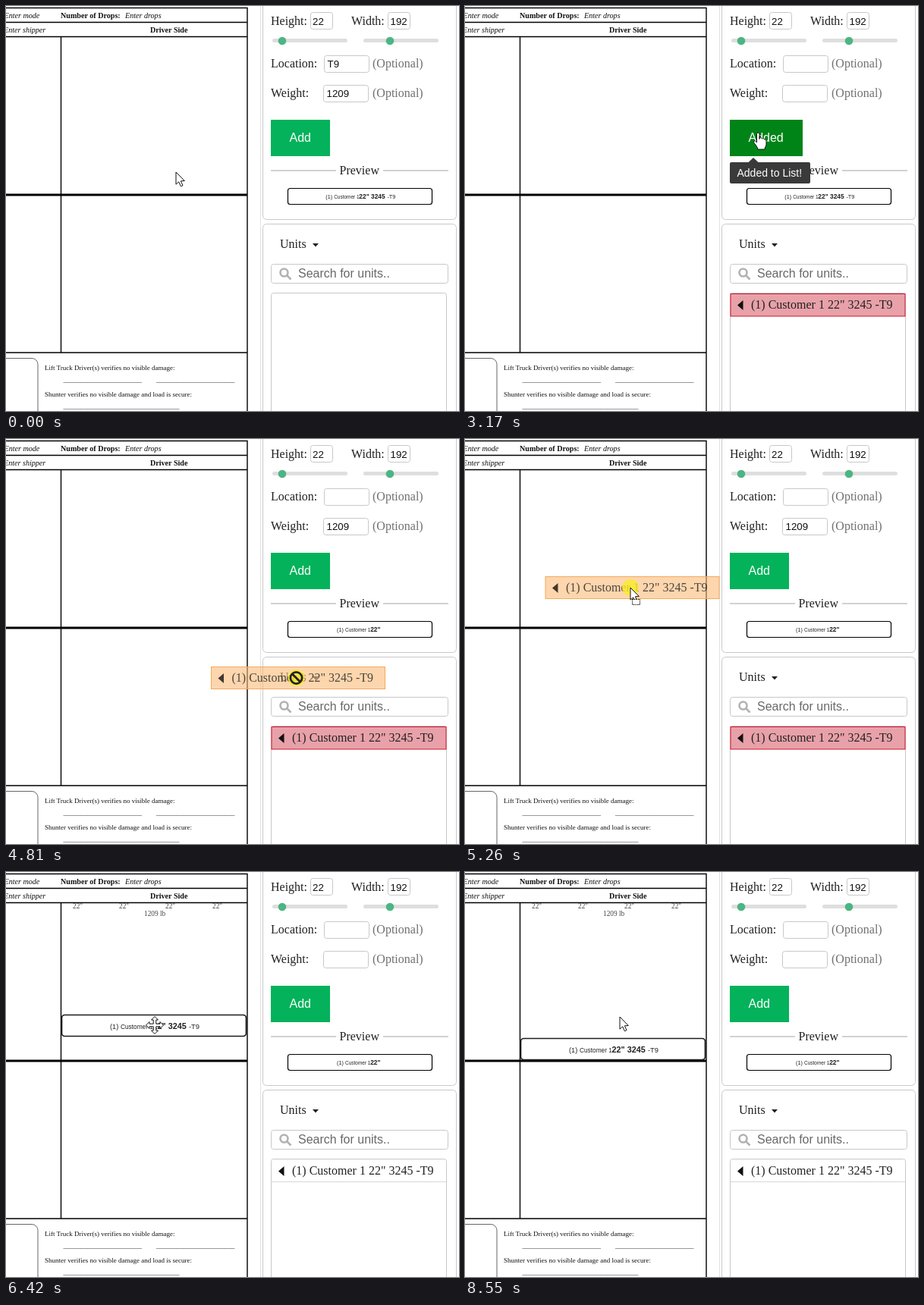
Animation of 597x534 px, one loop 9.71 s. Source, as an HTML page:

```html
<!DOCTYPE html>
<html lang="en">
<head>
<meta charset="utf-8">
<title>Drag a unit to the truck</title>
<style>
html, body { margin: 0; width: 100%; height: 100%; overflow: hidden; background: #fff; }
svg { display: block; width: 597px; height: 534px; }
text { font-family: "Liberation Serif", "Times New Roman", serif; font-size: 16px; fill: #212121; white-space: pre; }
.sans, .label text { font-family: "Liberation Sans", Arial, sans-serif; }
.field { font-size: 13.33px; fill: #111; }
.b { font-weight: bold; }
.i { font-style: italic; }
.form text { font-size: 10.1px; fill: #111; }
.form .small { font-size: 9px; }
.dims text { font-size: 9.3px; fill: #444; }
.grey { fill: #707070; }
.line { fill: none; stroke: #000; stroke-width: 1.4; }
.frame { fill: #fff; stroke: #c8c8c8; }
.tip path, .tip rect { fill: #3a3a3a; }
.tip text { fill: #fff; font-size: 14px; }
.ink { fill: #fff; stroke: #111; stroke-linejoin: round; }
</style>
</head>
<body>
<svg viewBox="0 0 597 534">
  <defs>
    <g id="full" class="label">
      <text x="-58" y="4" font-size="9.2" style="font-size:9.2px">(1)</text>
      <text x="-44" y="4" style="font-size:8.3px">Customer 1</text>
      <text class="b" x="-1.5" y="4" style="font-size:10.8px">22" 3245</text>
      <text x="46" y="4" style="font-size:9.4px">-T9</text>
    </g>
    <g id="brief" class="label">
      <text x="-39" y="4" style="font-size:9.2px">(1)</text>
      <text x="-25" y="4" style="font-size:8.3px">Customer 1</text>
      <text class="b" x="17.5" y="4" style="font-size:10.8px">22"</text>
    </g>
    <g id="row">
      <path d="M359 394.500l7.500-6.500v13z" fill="#111"/>
      <text x="377" y="399">(1) Customer 1 22" 3245 -T9</text>
    </g>
    <g id="unit">
      <rect x="-121.500" y="-14" width="243" height="28" rx="4" fill="#fff" stroke="#1c1c1c" stroke-width="1.700"/>
      <use href="#full"/>
    </g>
    <path id="pointer" class="ink" d="M0 0V16.200L3.700 12.800 6.400 18.800 9 17.600 6.400 11.800 11.300 11.500z"/>
  </defs>

  <g class="form">
    <path class="line" d="M0 2.500H318V534M0 21.500H318M0 40.500H318M72.500 40.500V457M0 457H318"/>
    <path class="line" style="stroke-width:3" d="M0 249H318"/>
    <rect x="-20" y="464.500" width="62" height="90" rx="8" fill="none" stroke="#666"/>
    <text class="i" x="-2.500" y="16">Enter mode</text>
    <text class="b" x="72" y="16">Number of Drops:</text>
    <text class="i" x="157" y="16">Enter drops</text>
    <text class="i" x="-3" y="35">Enter shipper</text>
    <text class="b" x="190" y="35">Driver Side</text>
    <text class="small" x="51" y="480">Lift Truck Driver(s) verifies no visible damage:</text>
    <text class="small" x="51" y="515">Shunter verifies no visible damage and load is secure:</text>
    <text class="small" x="75.500" y="496">_______________________</text>
    <text class="small" x="198" y="496">_______________________</text>
    <text class="small" x="75.500" y="531">__________________________________</text>
  </g>
  <g id="dims" class="dims">
    <text x="88" y="48">22"</text><text x="149" y="48">22"</text>
    <text x="210" y="48">22"</text><text x="272" y="48">22"</text>
    <text x="182" y="58">1209 lb</text>
  </g>

  <path d="M335.500 0V534" stroke="#e2e2e2"/>
  <rect class="frame" x="338.500" y="-20" width="255" height="301.500" rx="5"/>
  <rect class="frame" x="338.500" y="287.500" width="255" height="300" rx="5"/>

  <text x="349" y="25">Height:</text><text x="455" y="25">Width:</text>
  <text x="349" y="81">Location:</text><text x="349" y="120">Weight:</text>
  <text class="grey" x="483" y="81">(Optional)</text>
  <text class="grey" x="483" y="120">(Optional)</text>
  <rect class="frame" x="401.500" y="8.500" width="29" height="22" rx="3"/>
  <rect class="frame" x="503.500" y="8.500" width="29" height="22" rx="3"/>
  <rect class="frame" x="419.500" y="65.500" width="59" height="22" rx="3"/>
  <rect class="frame" x="418.500" y="104.500" width="59" height="22" rx="3"/>
  <text class="sans field" x="404" y="24.500">22</text>
  <text class="sans field" x="506.500" y="24.500">192</text>
  <text id="place" class="sans field" x="423.500" y="81">T9</text>
  <text id="weight" class="sans field" x="422.500" y="120">1209</text>
  <path d="M353.500 45.500H447.500M473.500 45.500H567.500" stroke="#dedede" stroke-width="5" stroke-linecap="round"/>
  <g fill="#4cb583"><circle cx="364" cy="46" r="5.300"/><circle cx="506" cy="46" r="5.300"/></g>

  <rect id="button" x="349" y="150" width="78" height="48"/>
  <text id="caption" class="sans" x="373.500" y="179" style="fill:#fff"></text>

  <path d="M349 217H435M497 217H583" stroke="#d2d2d2" stroke-width="2"/>
  <text x="439.500" y="222">Preview</text>
  <g id="preview">
    <rect x="-95" y="-10.500" width="190" height="21" rx="3" fill="#fff" stroke="#000" stroke-width="1.200"/>
    <use id="previewText" href="#full" transform="scale(.78)"/>
  </g>

  <text x="361" y="319">Units</text>
  <path d="M404 313h8l-4 4.500z" fill="#212121"/>
  <rect class="frame" x="349.500" y="340.500" width="233" height="25" rx="3"/>
  <g fill="none" stroke="#b2b2b2" stroke-width="2.600">
    <circle cx="366.500" cy="351.500" r="5"/><path d="M370.500 355.500L375.500 360.500"/>
  </g>
  <text class="sans" x="385" y="358" style="fill:#686868">Search for units..</text>
  <rect class="frame" x="349.500" y="378.500" width="231" height="190" rx="3"/>
  <g id="item">
    <path id="divider" d="M350 408.500H580" stroke="#d8d8d8"/>
    <rect id="itemFill" x="350" y="379.500" width="230" height="29.500" fill="#e8a1a9" stroke="#d0142c"/>
    <use href="#row"/>
  </g>

  <use id="placed" href="#unit"/>
  <g id="rowGhost">
    <rect x=".5" y=".5" width="229" height="29" fill="#fcbb79" fill-opacity=".6" stroke="#f3aa5c"/>
    <use href="#row" transform="translate(-349.500 -379)" opacity=".8"/>
  </g>
  <use id="unitGhost" href="#unit" opacity=".75"/>

  <g id="dragTip" class="tip">
    <path d="M395 281.500L402 275 409 281.500z"/>
    <rect x="371" y="281" width="147" height="28" rx="2"/>
    <text x="380" y="299">Drag and drop to truck</text>
  </g>
  <g id="addTip" class="tip">
    <path d="M373 206.500L380 200 387 206.500z"/>
    <rect id="addTipBox" x="349" y="206" width="86" height="28" rx="2"/>
    <text id="addTipText" class="sans" x="358.500" y="225"></text>
  </g>

  <g id="cursor">
    <circle id="press" r="11" fill="#f9ec2c" fill-opacity=".82"/>
    <use class="kind" data-kind="arrow" href="#pointer"/>
    <g class="kind" data-kind="drop">
      <use href="#pointer"/>
      <rect x="2.500" y="15.500" width="10" height="7" fill="#fff" stroke="#111" stroke-dasharray="1.500 1"/>
    </g>
    <path class="kind ink" data-kind="move" d="M0-11.500L4.500-7H1.800V-1.800H7V-4.500L11.500 0 7 4.500V1.800H1.800V7H4.500L0 11.500-4.500 7H-1.800V1.800H-7V4.500L-11.500 0-7-4.500V-1.800H-1.800V-7H-4.500z"/>
    <path class="kind ink" data-kind="hand" d="M-1.500 2C-1.500-.5 2-.5 2 2V8.500C3-.0 2 6.500 5.500 8 6.500 7 8.500 7.500 8.500 9 10 8.500 11 9.500 11 11V15.500C11 18 9 19 9 22H0C0 19-4.500 15-5.500 12.500-5.500 10.500-3.500 10-1.500 13z"/>
    <g class="kind" data-kind="no" fill="none" stroke="#222" stroke-width="2.800">
      <circle r="7.600"/><path d="M-5.300-5.300L5.300 5.300"/>
    </g>
  </g>
</svg>
<script>
const LOOP = 9710;
const el = {};
document.querySelectorAll('svg [id]').forEach(n => el[n.id] = n);
const kinds = [...document.querySelectorAll('.kind')];

// start, end, steps, then [progress, x, y] stops
const moves = [
  [370, 1060, 10, [[0, 224, 219], [1, 432, 250]]],
  [1780, 2160, 6, [[0, 432, 250], [1 / 6, 427, 235], [1, 386, 167]]],
  [3650, 4260, 9, [[0, 386, 167], [1, 462, 394]]],
  [4560, 5500, 13, [[0, 462, 394], [4 / 13, 382.5, 315], [6 / 13, 290, 235], [9 / 13, 218, 196], [1, 210, 195]]],
  [5560, 5970, 6, [[0, 210, 195], [1, 196, 202]]],
  [7200, 7760, 8, [[0, 196, 202], [1, 213, 220]]],
  [8140, 8550, 6, [[0, 213, 220], [1, 204, 191]]]
];

// [time, value] tables; a value holds until the next entry
const tracks = {
  kind: [[0, 'arrow'], [900, 'move'], [1840, 'arrow'], [2008, 'hand'], [3726, 'arrow'], [3802, 'move'], [3878, 'arrow'],
    [4260, 'move'], [4560, 'no'], [4951, 'drop'], [6360, 'move'], [7200, 'drop'], [7990, 'move'], [8140, 'arrow']],
  press: [[0, 0], [2860, 1], [3010, 0], [4560, 1], [6360, 0], [7050, 1], [7990, 0]],
  place: [[0, 'T9'], [2940, '']],
  weight: [[0, '1209'], [2940, ''], [4560, '1209'], [6420, ''], [7200, '1209'], [8140, '']],
  button: [[0, 'idle'], [2008, 'hover'], [2940, 'added'], [3726, 'idle']],
  addTip: [[0, ''], [2720, 'Add to List'], [2940, 'Added to List!'], [3726, '']],
  dragTip: [[0, 0], [980, 1], [1840, 0]],
  preview: [[0, '#full'], [4560, '#brief']],
  item: [[0, ''], [2940, 'red'], [6420, 'white'], [7200, 'red'], [8140, 'white']],
  ghost: [[0, ''], [4560, 'row'], [6360, ''], [7200, 'unit'], [7990, '']],
  placed: [[0, 0], [6360, 202.5], [7200, 0], [7990, 233.5]]
};
const zoom = [[0, 1], [900, 1], [1050, 1.2], [1800, 1.2], [1960, 1], [3802, 1], [3870, 1.08], [3950, 1], [LOOP, 1]];

const held = (table, t) => table.filter(k => k[0] <= t).pop()[1];
const show = (node, on) => node.style.display = on ? '' : 'none';
const put = (node, x, y, s = 1) => node.setAttribute('transform', `translate(${x} ${y}) scale(${s})`);

function mix(stops, p) {
  const i = Math.max(1, stops.findIndex(s => s[0] >= p));
  const a = stops[i - 1], b = stops[i];
  const f = (p - a[0]) / (b[0] - a[0]);
  return a.slice(1).map((v, j) => v + (b[j + 1] - v) * f);
}

function cursorAt(t) {
  const [start, end, n, stops] = moves.filter(m => m[0] <= t).pop() || moves[0];
  if (t < start) return mix(stops, 0);
  const step = Math.floor((t - start) / (end - start) * (n - 1)) + 1;
  return mix(stops, Math.min(1, step / n));
}

function draw(t) {
  const s = {};
  for (const name in tracks) s[name] = held(tracks[name], t);
  const [x, y] = cursorAt(t);

  put(el.cursor, x, y);
  kinds.forEach(k => show(k, k.dataset.kind === s.kind));
  show(el.press, s.press);

  el.place.textContent = s.place;
  el.weight.textContent = s.weight;
  el.button.setAttribute('fill', s.button === 'idle' ? '#03b25a' : '#008418');
  el.button.setAttribute('width', s.button === 'added' ? 96 : 78);
  el.caption.textContent = s.button === 'added' ? 'Added' : 'Add';

  show(el.addTip, s.addTip);
  el.addTipText.textContent = s.addTip;
  el.addTipBox.setAttribute('width', s.addTip.endsWith('!') ? 106 : 86);
  show(el.dragTip, s.dragTip);

  put(el.preview, 466.5, 251, mix(zoom, t)[0]);
  el.previewText.setAttribute('href', s.preview);
  show(el.item, s.item);
  show(el.itemFill, s.item === 'red');

  show(el.rowGhost, s.ghost === 'row');
  put(el.rowGhost, x - 112.5, y - 15);
  show(el.unitGhost, s.ghost === 'unit');
  put(el.unitGhost, x - 1, y);
  show(el.placed, s.placed);
  put(el.placed, 195, s.placed);
  show(el.dims, t >= 6360);
}

const begun = performance.now();
function tick() {
  draw((performance.now() - begun) % LOOP);
  requestAnimationFrame(tick);
}
tick();
</script>
</body>
</html>
```
